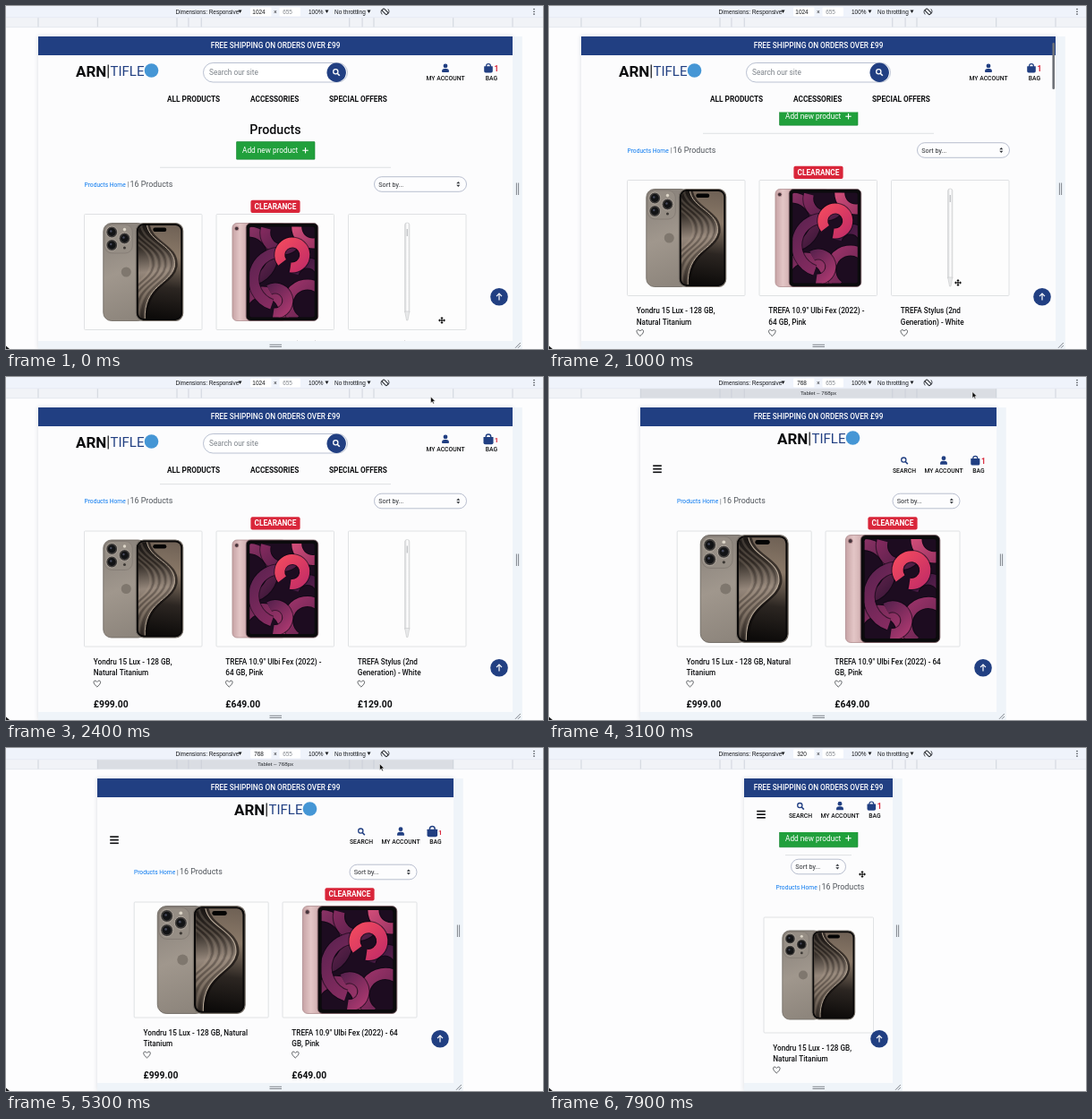
An HTML page with a canvas for the animation above (8 s loop, 600x383 px).

```html
<!DOCTYPE html>
<html lang="en">
<head>
<meta charset="utf-8">
<title>Responsive shop preview</title>
<style>
html, body { margin: 0; width: 100%; height: 100%; overflow: hidden; background: #fdfdfe; }
canvas { display: block; width: 600px; height: 383px; }
</style>
</head>
<body>
<canvas id="stage"></canvas>
<script>
const W = 600, H = 383, LOOP = 8000, MID = 301, SCALE = 0.5176;
const canvas = document.getElementById('stage');
const ctx = canvas.getContext('2d');
const dpr = Math.max(1, window.devicePixelRatio || 1);
canvas.width = W * dpr;
canvas.height = H * dpr;

const NAVY = '#213f82', INK = '#0c0d0f', GREY = '#50555b', RED = '#d9263a';
const ROBOTO = 'Roboto, Arial, sans-serif', ARIAL = '"Liberation Sans", Arial, sans-serif';

const DEVICES = [[320, 'Mobile S'], [375, 'Mobile M'], [425, 'Mobile L'], [768, 'Tablet'], [1024, 'Laptop']];
const LAYOUTS = {
  1024: { cards: [87.5, 235, 382.5], cardW: 131.5, cardY: 232.5, wrap: 110, art: 1, crumb: 87.5, crumbY: 199,
          sort: [411.5, 514.5], sortY: 199, rule: [172, 430], clip: 118.5, badge: 301 },
  768: { cards: [143.2, 309], cardW: 150, cardY: 232.5, wrap: 131, art: 1.1, crumb: 143, crumbY: 199,
         sort: [384, 459], sortY: 199, clip: 120.5, badge: 384 },
  425: { cards: [218], cardW: 167, cardY: 249.5, wrap: 140, art: 1.1, crumb: 253.5, crumbY: 216,
         sort: [259.5, 343], sortY: 193, rule: [251, 351], clip: 94 },
  320: { cards: [240], cardW: 122.5, cardY: 249.5, wrap: 103, art: 0.91, crumb: 253.5, crumbY: 216,
         sort: [270.5, 331.5], sortY: 193, rule: [264, 338], clip: 94 }
};
const PRODUCTS = [
  { title: 'Yondru 15 Lux - 128 GB, Natural Titanium', price: '£999.00', draw: phone },
  { title: 'TREFA 10.9" Ulbi Fex (2022) - 64 GB, Pink', price: '£649.00', draw: slate },
  { title: 'TREFA Stylus (2nd Generation) - White', price: '£129.00', draw: stylus }
];
// time, x, y
const MOUSE = [[0, 487, 351], [450, 487, 351], [1000, 457, 309], [1250, 456, 286], [1500, 457, 280], [2150, 474, 40],
  [2400, 474.5, 22], [2650, 473.5, 18], [3100, 473, 16.5], [4700, 473, 17], [5300, 417.5, 17.7], [5750, 402, 18],
  [6300, 400, 18], [7000, 400, 18], [7250, 379, 18], [7450, 379, 18], [7900, 350, 141]];
const SCROLL = [[0, 0], [400, 0], [1000, 38], [1300, 60.5]];

function track(keys, t, i) {
  const n = keys.findIndex(k => k[0] > t);
  if (n < 0) return keys[keys.length - 1][i];
  const a = keys[n - 1], b = keys[n], p = (t - a[0]) / (b[0] - a[0]);
  return a[i] + (b[i] - a[i]) * p * p * (3 - 2 * p);
}

// y is the middle of the capitals
function text(s, x, y, size, color = INK, weight = 400, align = 'left', family = ROBOTO) {
  ctx.font = `${weight} ${size}px ${family}`;
  ctx.textAlign = align;
  ctx.fillStyle = color;
  ctx.fillText(s, x, y + size * 0.357);
}
function rect(x, y, w, h, color) {
  ctx.fillStyle = color;
  ctx.fillRect(x, y, w, h);
}
function box(x, y, w, h, r, fill, stroke, lw = 1) {
  ctx.beginPath();
  ctx.roundRect(x, y, w, h, r);
  paint(fill, stroke, lw);
}
function disc(x, y, r, fill, stroke, lw = 1) {
  ctx.beginPath();
  ctx.arc(x, y, r, 0, 7);
  paint(fill, stroke, lw);
}
function paint(fill, stroke, lw) {
  if (fill) { ctx.fillStyle = fill; ctx.fill(); }
  if (stroke) { ctx.strokeStyle = stroke; ctx.lineWidth = lw; ctx.stroke(); }
}
function poly(points, fill, stroke, lw = 1) {
  ctx.beginPath();
  points.forEach(([x, y]) => ctx.lineTo(x, y));
  if (fill) ctx.closePath();
  paint(fill, stroke, lw);
}
function at(x, y, s, draw) {
  ctx.save();
  ctx.translate(x, y);
  ctx.scale(s, s);
  draw();
  ctx.restore();
}
function gradient(x0, y0, x1, y1, ...colors) {
  const g = ctx.createLinearGradient(x0, y0, x1, y1);
  colors.forEach((c, i) => g.addColorStop(i / (colors.length - 1), c));
  return g;
}
function clipBox(x, y, w, h, r, draw) {
  ctx.save();
  ctx.beginPath();
  ctx.roundRect(x, y, w, h, r);
  ctx.clip();
  draw();
  ctx.restore();
}

function phone() {
  box(-44.5, -54.5, 48, 109, 9, gradient(-44, -50, -6, 50, '#88817a', '#a0978d', '#8d857c'), '#6c665f', 0.8);
  box(-43, -53, 31, 32, 8, '#968e85', '#7c756d', 0.6);
  [[-35, -44.5], [-35, -30], [-20.8, -37.5]].forEach(([x, y]) => {
    disc(x, y, 6.4, '#3f3c3a', '#c4bbb0', 0.7);
    disc(x, y, 4.4, '#121315');
    disc(x - 1, y - 1, 1.2, '#45485a');
  });
  disc(-20.8, -47.5, 1.7, '#ddd6c8');
  disc(-20.8, -27, 1.5, '#3c3834');
  disc(-19, 0, 5.5, '#7f776e');
  box(-8, -54.5, 52.5, 109, 8.5, '#090808', '#7b746c', 1.1);
  clipBox(-5.4, -52, 47.4, 104, 6, () => {
    rect(-6, -53, 50, 106, gradient(36, -52, 22, 52, '#6f6155', '#8a7968', '#2c2622', '#0d0b0a'));
    const fold = shift => {
      ctx.beginPath();
      ctx.moveTo(4 - shift, -54);
      ctx.bezierCurveTo(6 - shift, -32, 38 - shift, -30, 35 - shift, -6);
      ctx.bezierCurveTo(31 - shift, 14, 0 - shift, 14, 2 - shift, 54);
    };
    fold(0);
    ctx.lineTo(-8, 54);
    ctx.lineTo(-8, -54);
    paint(gradient(0, -52, 10, 52, '#1b1816', '#3a332d', '#94867a', '#6e6257', '#2d2723'));
    for (let i = 1; i < 9; i++) {
      fold(i * 3.4);
      paint(null, i % 2 ? 'rgba(25,20,17,.28)' : 'rgba(190,172,152,.2)', 2.2);
    }
    fold(-1.8);
    paint(null, 'rgba(10,8,7,.6)', 3);
    fold(0);
    paint(null, '#b9aa99', 1);
  });
  box(11, -49.5, 15, 4.4, 2.2, '#040404');
}

function slate() {
  box(-47.8, -54.5, 60, 109, 5, gradient(-47, 0, -32, 0, '#c9a6a8', '#e3c6c6', '#d2b0b2'), '#a98689', 0.7);
  disc(-43, -48.5, 2.3, '#46353b', '#c89a9e', 0.7);
  box(-32.5, -54.5, 80.5, 109, 5, '#0b0a0c', '#7b5f65', 0.8);
  clipBox(-28.5, -50.5, 72.5, 101, 2, () => {
    rect(-29, -51, 74, 102, '#1d0c20');
    // x, y, radius, start and end angle, two colours
    [[-30, -18, 27, 4.6, 7.9, '#a13a72', '#3c1738'], [8, -44, 19, 0.2, 3.4, '#8c2c63', '#4a1c42'],
     [42, -50, 18, 1.2, 3.2, '#e2557f', '#8d2d5e'], [-14, 46, 24, 3.1, 6.6, '#6a2554', '#b23d74'],
     [36, 36, 22, 2.2, 5.5, '#9c3369', '#4e1d45'], [6, 8, 30, 1.9, 4.6, '#5c2250', '#9b3169'],
     [36, 6, 16, 3.4, 6.4, '#35143a', '#792a5d'], [19, -19, 14, 2.5, 8, '#f0485f', '#c52e66'],
     [0, 32, 14, 4.2, 8, '#54204c', '#a9386f']
    ].forEach(([x, y, r, a, b, from, to]) => {
      ctx.beginPath();
      ctx.arc(x, y, r, a, b);
      paint(null, 'rgba(14,5,18,.6)', 13);
      paint(null, gradient(x - r, y - r, x + r, y + r, from, to), 11);
    });
  });
}

function stylus() {
  box(-2.6, -55, 5.2, 100, [2.5, 2.5, 0, 0], gradient(-2.6, 0, 2.6, 0, '#d2d3d5', '#ffffff', '#e0e1e3'), '#c6c8ca', 0.6);
  poly([[-2.6, 44], [-0.7, 54], [0.7, 54], [2.6, 44]], '#e8e9ea', '#c6c8ca', 0.6);
  rect(-0.6, -48, 1.2, 8, '#bbbdc0');
}

function userIcon(x, y) {
  disc(x, y - 2.6, 2.4, NAVY);
  box(x - 4, y + 0.5, 8, 4, [3.5, 3.5, 1, 1], NAVY);
}
function lens(x, y, color) {
  disc(x - 0.7, y - 0.7, 2.6, null, color, 1.3);
  poly([[x + 1.2, y + 1.2], [x + 3.8, y + 3.8]], null, color, 1.6);
}
function bag(x, y, beat) {
  at(x, y, 1 + 0.2 * beat, () => {
    box(-4.8, -2.2, 9.6, 7.2, [0.5, 0.5, 1.8, 1.8], NAVY);
    ctx.beginPath();
    ctx.arc(0, -2.4, 2.4, Math.PI, 0);
    ctx.lineTo(2.4, -0.5);
    ctx.moveTo(-2.4, -2.4);
    ctx.lineTo(-2.4, -0.5);
    paint(null, NAVY, 1.2);
  });
  text('1', x + 9, y + 0.6, 8.6 - beat, RED, 700, 'center');
}
function heart(x, y) {
  ctx.beginPath();
  ctx.moveTo(x, y + 3.5);
  ctx.bezierCurveTo(x - 7, y - 2, x - 2.6, y - 5.5, x, y - 2);
  ctx.bezierCurveTo(x + 2.6, y - 5.5, x + 7, y - 2, x, y + 3.5);
  paint(null, '#33363a', 0.8);
}
function logo(x, y) {
  text('ARN', x, y, 17, INK, 700);
  rect(x + 35.6, y - 7, 1.2, 15, INK);
  text('TIFLE', x + 38.5, y, 15, NAVY, 400);
  disc(x + 84.5, y - 0.5, 7.8, '#4596d5');
}
function label(s, x, y) {
  text(s, x, y, 6.8, INK, 500, 'center');
}

function header(size, x0, x1, beat) {
  rect(x0, 34, x1 - x0, 21, NAVY);
  text('FREE SHIPPING ON ORDERS OVER £99', MID, 44.5, 8.28, '#fff', 500, 'center');
  if (size === 1024) {
    logo(78, 72.5);
    box(220.5, 63.5, 161, 21.5, 10.7, '#fff', '#a9b2c6', 0.8);
    text('Search our site', 227, 74.2, 8.28, '#7d838a');
    disc(369.2, 74.2, 10.7, NAVY);
    lens(369, 74, '#fff');
    userIcon(491, 69.5);
    label('MY ACCOUNT', 491, 80.8);
    bag(539, 69.5, beat);
    label('BAG', 542.5, 80.8);
    text('ALL PRODUCTS', 180, 104, 8.28, INK, 700);
    text('ACCESSORIES', 273, 104, 8.28, INK, 700);
    text('SPECIAL OFFERS', 361, 104, 8.28, INK, 700);
    return;
  }
  const y = size === 768 ? 104.5 : 76;
  if (size === 768) logo(255, 68.5);
  for (let i = -1; i < 2; i++) rect(x0 + 14.2, y - 2.6 + i * 3.6, 9.6, 1.6, INK);
  lens(x1 - 103, y - 11.2, NAVY);
  label('SEARCH', x1 - 103, y);
  userIcon(x1 - 59, y - 11.2);
  label('MY ACCOUNT', x1 - 59, y);
  bag(x1 - 23.7, y - 11.2, beat);
  label('BAG', x1 - 20, y);
}

function wrap(s, limit) {
  ctx.font = `500 8.2px ${ROBOTO}`;
  return s.split(' ').reduce((lines, word) => {
    const last = lines.length - 1, next = (lines[last] + ' ' + word).trim();
    if (ctx.measureText(next).width <= limit) lines[last] = next;
    else lines.push(word);
    return lines;
  }, ['']);
}

function card(p, x, y, L) {
  box(x, y, L.cardW, 129, 1, '#fdfdfd', '#d9dbde', 0.8);
  at(x + L.cardW / 2, y + 64.5, L.art, p.draw);
  wrap(p.title, L.wrap).forEach((line, i) => text(line, x + 10.3, y + 146 + i * 12.5, 8.2, INK, 500));
  heart(x + 14.3, y + 170.5);
  text(p.price, x + 10.3, y + 193, 10.35, INK, 700);
}

function content(L, dy, x0, x1) {
  ctx.save();
  ctx.beginPath();
  ctx.rect(x0, L.clip, x1 - x0, 374 - L.clip);
  ctx.clip();
  ctx.translate(0, -dy);
  text('Products', MID, 137.5, 14.2, INK, 500, 'center');
  box(257.5, 151.5, 87.5, 19.7, 0.5, '#21a03c', '#178431', 0.6);
  text('Add new product', 264, 161.3, 8.28, '#fff');
  rect(331.3, 160.7, 6.4, 1.1, '#fff');
  rect(334, 158, 1.1, 6.4, '#fff');
  if (L.rule) rect(L.rule[0], 179.8, L.rule[1] - L.rule[0], 0.8, '#d8dadd');
  const c = L.crumb, [a, b] = L.sort;
  text('Products Home', c, L.crumbY + 0.3, 6.65, '#0a79f0');
  text('|', c + 48, L.crumbY, 6.9, GREY);
  text('16 Products', c + 51, L.crumbY - 0.2, 8.9, GREY);
  box(a, L.sortY - 8.3, b - a, 16.6, 8.3, '#fdfdfe', '#9ba4ba', 0.7);
  text('Sort by...', a + 4.7, L.sortY, 7.25, '#2a2d31');
  const k = b - 9.2, m = L.sortY;
  poly([[k - 2, m - 0.7], [k, m - 3], [k + 2, m - 0.7]], '#2c3036');
  poly([[k - 2, m + 0.7], [k, m + 3], [k + 2, m + 0.7]], '#2c3036');
  L.cards.forEach((x, i) => card(PRODUCTS[i], x, L.cardY, L));
  if (L.badge) {
    box(L.badge - 27.6, 216.7, 55.2, 14.4, 2, RED);
    text('CLEARANCE', L.badge, 224, 8.28, '#fff', 700, 'center');
  }
  ctx.restore();
}

function toolbar(size, hover) {
  rect(0, 0, W, 24, '#eff3fb');
  rect(0, 12.6, W, 0.7, '#dde2ea');
  rect(0, 13.2, W, 10.3, '#f1f3f7');
  if (hover) {
    const w = hover[0] * SCALE;
    rect(MID - w / 2, 13.2, w, 10.3, '#dadde3');
  }
  DEVICES.forEach(([px]) => [-1, 1].forEach(side => rect(MID + side * px * SCALE / 2 - 0.4, 13.2, 0.8, 10.3, '#c8cdd6')));
  rect(0, 23.5, W, 0.6, '#dde1e8');
  if (hover) text(`${hover[1]} – ${hover[0]}px`, MID, 18, 6.2, '#25282d', 400, 'center', ARIAL);

  const bar = (s, x, color = '#15171a', align = 'left') => text(s, x, 6.2, 6.45, color, 400, align, ARIAL);
  const caret = x => poly([[x - 2, 4.6], [x + 2, 4.6], [x, 8]], '#15171a');
  bar('Dimensions: Responsive', 189.5);
  caret(261.5);
  box(273, 1.5, 23.5, 10, 1, '#fff');
  bar(size, 282.5, '#15171a', 'center');
  bar('×', 301, '#15171a', 'center');
  box(305.5, 1.5, 23.5, 10, 1, '#fff');
  bar('655', 314.5, '#85898f', 'center');
  bar('100%', 338);
  caret(358.5);
  bar('No throttling', 367);
  caret(405.5);
  at(423.5, 6.3, 1, () => {
    ctx.rotate(Math.PI / 4);
    box(-3.6, -1.6, 7.2, 3.2, 0.8, null, '#25282d', 1);
    ctx.beginPath();
    ctx.arc(0, 0, 4.5, -1.5, -0.3);
    ctx.moveTo(-4.3, 1.3);
    ctx.arc(0, 0, 4.5, 2.84, 1.6, true);
    paint(null, '#25282d', 0.8);
  });
  [3.5, 6.3, 9.1].forEach(y => disc(590, y, 0.8, '#3a3e44'));
}

function frameGrips(x0, x1) {
  rect(x1, 34, 10.8, 349, '#eff4f9');
  rect(x0, 374, x1 - x0, 9, '#eff4f9');
  rect(x1 + 3.9, 197.5, 0.9, 13.5, '#73787f');
  rect(x1 + 6.2, 197.5, 0.9, 13.5, '#73787f');
  rect(294.5, 377.8, 13.5, 0.9, '#73787f');
  rect(294.5, 380.1, 13.5, 0.9, '#73787f');
  poly([[x1 + 3, 381.8], [x1 + 8.8, 376]], null, '#73787f', 0.9);
  poly([[x1 + 6, 381.8], [x1 + 8.8, 379]], null, '#73787f', 0.9);
}

function cursor(x, y) {
  if (y < 34) {
    at(x, y, 0.62, () => poly([[0, 0], [0, 11.5], [2.7, 9], [4.5, 13], [6.4, 12.2], [4.6, 8.3], [8.2, 8.1]], '#0b0b0b', '#fff', 0.9));
    return;
  }
  at(x, y, 1, () => {
    for (let pass = 0; pass < 2; pass++) {
      const color = pass ? '#090909' : '#fff', lw = pass ? 1.1 : 2.4;
      poly([[-3, 0], [3, 0]], null, color, lw);
      poly([[0, -3], [0, 3]], null, color, lw);
      for (let i = 0; i < 4; i++) {
        poly([[2.1, -1.7], [4, 0], [2.1, 1.7]], color, pass ? null : color, 0.8);
        ctx.rotate(Math.PI / 2);
      }
    }
  });
}

function draw(t) {
  const size = t < 2850 ? 1024 : t < 5850 ? 768 : t < 7380 ? 425 : 320;
  const L = LAYOUTS[size], half = Math.round(size * SCALE / 2), x0 = MID - half, x1 = MID + half;
  const mx = track(MOUSE, t, 1), my = track(MOUSE, t, 2);
  const hover = my < 21.5 && DEVICES.find(d => Math.abs(mx - MID) < d[0] * SCALE / 2);
  const phase = (t % 1000) / 600;
  const beat = phase < 1 ? Math.sin(Math.PI * phase) ** 2 : 0;
  const dy = track(SCROLL, t, 1);

  ctx.setTransform(dpr, 0, 0, dpr, 0, 0);
  rect(0, 0, W, H, '#fdfdfe');
  toolbar(size, hover);

  ctx.save();
  ctx.shadowColor = 'rgba(40,55,80,.16)';
  ctx.shadowBlur = 5 * dpr;
  rect(x0, 34, x1 - x0, 349, '#fcfcfd');
  ctx.restore();
  frameGrips(x0, x1);
  content(L, dy, x0, x1);
  header(size, x0, x1, beat);

  disc(x1 - 15, 324.7, 9.8, NAVY);
  poly([[x1 - 15, 328.4], [x1 - 15, 321.3]], null, '#fff', 1.2);
  poly([[x1 - 18, 324.2], [x1 - 15, 321.2], [x1 - 12, 324.2]], null, '#fff', 1.2);

  const thumb = t > 400 && t < 1900 ? Math.min(1, (1900 - t) / 300) : 0;
  if (thumb) box(x1 - 3.6, 35 + dy * 0.16, 2.6, 52, 1.3, `rgba(110,114,120,${thumb})`);

  poly([[0, 379.5], [0, 383], [4, 383]], '#17181a');
  cursor(mx, my);
}

function tick(now) {
  draw(now % LOOP);
  requestAnimationFrame(tick);
}
draw(0);
requestAnimationFrame(tick);
</script>
</body>
</html>
```
